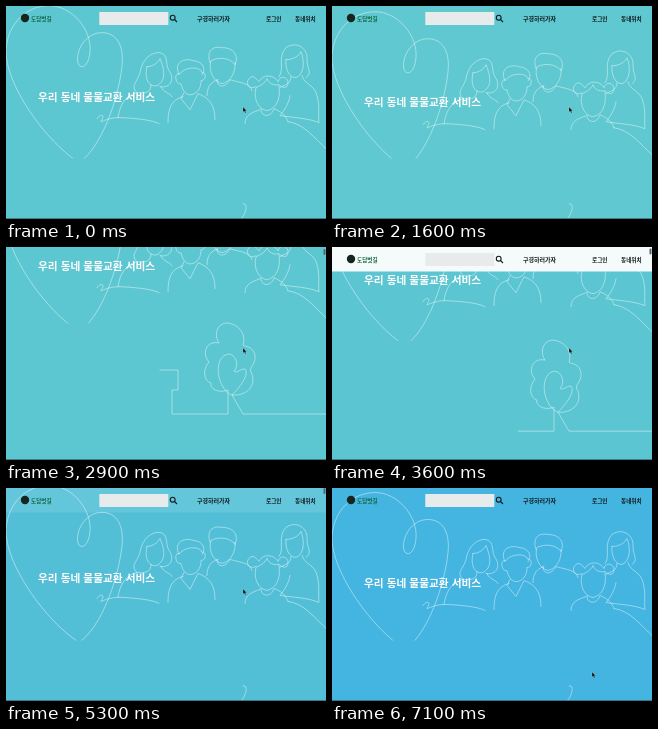
These frames come from a looping animation (320 px wide and 213 px high, 7.2 s). An HTML page:

```html
<!DOCTYPE html>
<html lang="ko">
<head>
<meta charset="utf-8">
<style>
  html, body { margin: 0; width: 100%; height: 100%; overflow: hidden; }
  svg { display: block; width: 100vw; height: 100vh; }
  text { font-family: "Noto Sans CJK KR", "Noto Sans CJK", sans-serif; font-weight: 900; font-size: 5.6px; fill: #10191b; }
  .line { fill: none; stroke: #fff; stroke-width: .7; stroke-opacity: .62; stroke-linecap: round; stroke-linejoin: round; }
</style>
</head>
<body>
<svg viewBox="0 0 320 213" preserveAspectRatio="none">
  <clipPath id="hero"><rect width="320" height="152.5"/></clipPath>
  <rect id="sky" width="320" height="213"/>
  <g id="page">
    <g clip-path="url(#hero)">
      <g id="drawing" class="line">
        <!-- heart -->
        <path d="M73 163C40 142-1 85 0 50C2 22 22 6 43 6C66 6 86 30 84 52C83 64 78 68 75 67C69 65 71 50 78 42C84 35 90 33 96 33C112 33 118 48 116 66C113 97 96 148 73 163"/>
        <g transform="translate(0 5)">
          <!-- mother -->
          <path d="M91 114C94 109 99 110 96 115C92 121 99 112 116 113C135 114 148 116 153 119"/>
          <path d="M112 113C114 99 120 91 131 88C124 81 131 78 134 68C136 54 146 47 154 48C163 50 159 60 163 66C169 74 165 84 154 82M141 62C147 62 152 58 154 54C159 66 160 76 151 81C143 83 138 74 141 62M145 80C145 87 141 89 131 88M155 82C157 88 164 88 166 92"/>
          <!-- father -->
          <path d="M162 118C162 104 165 95 177 92M173 69C167 68 170 81 175 79C177 89 183 93 190 88C194 85 195 80 195 76C201 76 200 66 196 68C194 61 178 62 173 70C167 57 179 53 187 56C198 57 200 65 196 70M178 88L175 94L184 105L192 89C203 93 209 100 209 115"/>
          <!-- son -->
          <path d="M201 91C201 82 205 77 212 75M204 58C200 46 207 41 216 43C228 43 233 51 229 60C224 53 213 52 205 56C202 65 207 77 216 79C225 77 230 67 229 58M211 75C211 83 219 84 224 75C233 78 244 78 246 86"/>
          <!-- daughter -->
          <path d="M239 119C239 110 246 108 254 105M250 82C243 86 239 78 243 74C247 69 251 75 253 77C257 69 268 70 272 77C274 70 282 72 282 78C282 85 276 83 273 80C267 81 263 79 261 74C259 79 254 81 250 83C247 95 253 105 261 106C270 104 275 95 273 81M255 104C254 112 265 114 268 104C278 108 281 114 282 117"/>
          <!-- grandmother -->
          <path d="M273 72C279 65 271 52 280 43C290 36 302 43 301 55C301 65 307 68 300 73M280 55C288 55 293 51 295 47C299 57 298 70 290 73C283 73 279 64 280 55M285 72C285 80 278 80 274 83M296 71C298 80 309 80 311 91C314 101 312 110 313 118C301 113 286 113 274 111C279 105 283 98 284 91M282 117C298 119 308 133 321 145"/>
        </g>
      </g>
    </g>
    <path id="tree" class="line" pathLength="1" d="M320 243H237L226 224C236 214 243 203 239 198C236 197 230 203 228 200C233 196 231 184 223 183C211 184 209 203 217 216C220 221 223 223 226 224C239 225 250 217 246 203C241 196 250 195 249 185C248 175 239 176 237 174C241 161 230 152 220 152C210 153 208 165 213 172C201 169 195 182 203 191C196 199 198 210 205 212C203 217 212 223 222 219V243H166V219H172V199H154"/>
    <text id="slogan" x="32" style="font-size:10.7px;fill:#fff">우리 동네 물물교환 서비스</text>
  </g>
  <g id="header">
    <rect id="bar" width="320" height="24.5" fill="#f5fafb"/>
    <circle cx="19" cy="12" r="4.2" fill="#17251f"/>
    <text x="25" y="14.5" style="fill:#146743">도담벗길</text>
    <rect x="93.3" y="6" width="69" height="13" fill="#e8ebeb"/>
    <g fill="none" stroke="#10191b" stroke-width="1.1"><circle cx="166.7" cy="11.7" r="2.4"/><path d="M168.5 13.5L171 16"/></g>
    <text x="191" y="14.5" style="font-size:6px">구경하러가자</text>
    <text x="260" y="14.5">로그인</text>
    <text x="289" y="14.5">동네위치</text>
  </g>
  <rect id="thumb" x="317.5" width="2" height="6" rx="1" fill="#52666b"/>
  <path d="M0 212.5H320" stroke="#345f68" opacity=".7"/>
  <path id="cursor" d="M0 0V5L1.2 4L2.1 6L3 5.5L2.2 3.7H3.7Z" fill="#111" stroke="#dfeff0" stroke-width=".2"/>
</svg>
<script>
const LOOP = 7200, STEP = 100, DEPTH = 76;
const TEAL = [95, 200, 208], BLUE = [68, 180, 224];

const set = (id, name, value) => document.getElementById(id).setAttribute(name, value);
const move = (id, x, y) => set(id, "transform", `translate(${x} ${y})`);

// Eased 0 to 1 between two times
function ramp(t, from, to) {
  const u = Math.min(1, Math.max(0, (t - from) / (to - from)));
  return u * u * (3 - 2 * u);
}

// Rises to 1, holds, and falls back to 0
const pulse = (t, a, b, c, d) => ramp(t, a, b) - ramp(t, c, d);

function draw(t) {
  const scroll = DEPTH * pulse(t, 1600, 2100, 3000, 4950);
  const bob = -4.5 * (1 + Math.cos(2 * Math.PI * (t - 4900) / 6000));
  const blueness = ((t - 1500) / 5600) ** 2;
  const sky = TEAL.map((c, i) => Math.round(c + (BLUE[i] - c) * blueness));

  set("sky", "fill", `rgb(${sky})`);
  move("page", 0, -scroll);
  move("drawing", 0, bob);
  set("slogan", "y", 100.5 + bob * .8);
  set("tree", "stroke-dasharray", `${.24 + .0103 * scroll} 2`);

  move("header", 0, -26 * pulse(t, 1650, 1900, 3100, 3300));
  set("bar", "opacity", pulse(t, 3000, 3100, 4900, 5400));
  move("thumb", 0, scroll / 40);
  set("thumb", "opacity", pulse(t, 1600, 1700, 5300, 5600));

  const reach = ramp(t, 6400, 7000);
  move("cursor", 237 + 23 * reach, 101 + 83 * reach);
}

function frame(now) {
  draw(Math.floor(now % LOOP / STEP) * STEP);
  requestAnimationFrame(frame);
}
draw(0);
requestAnimationFrame(frame);
</script>
</body>
</html>
```
